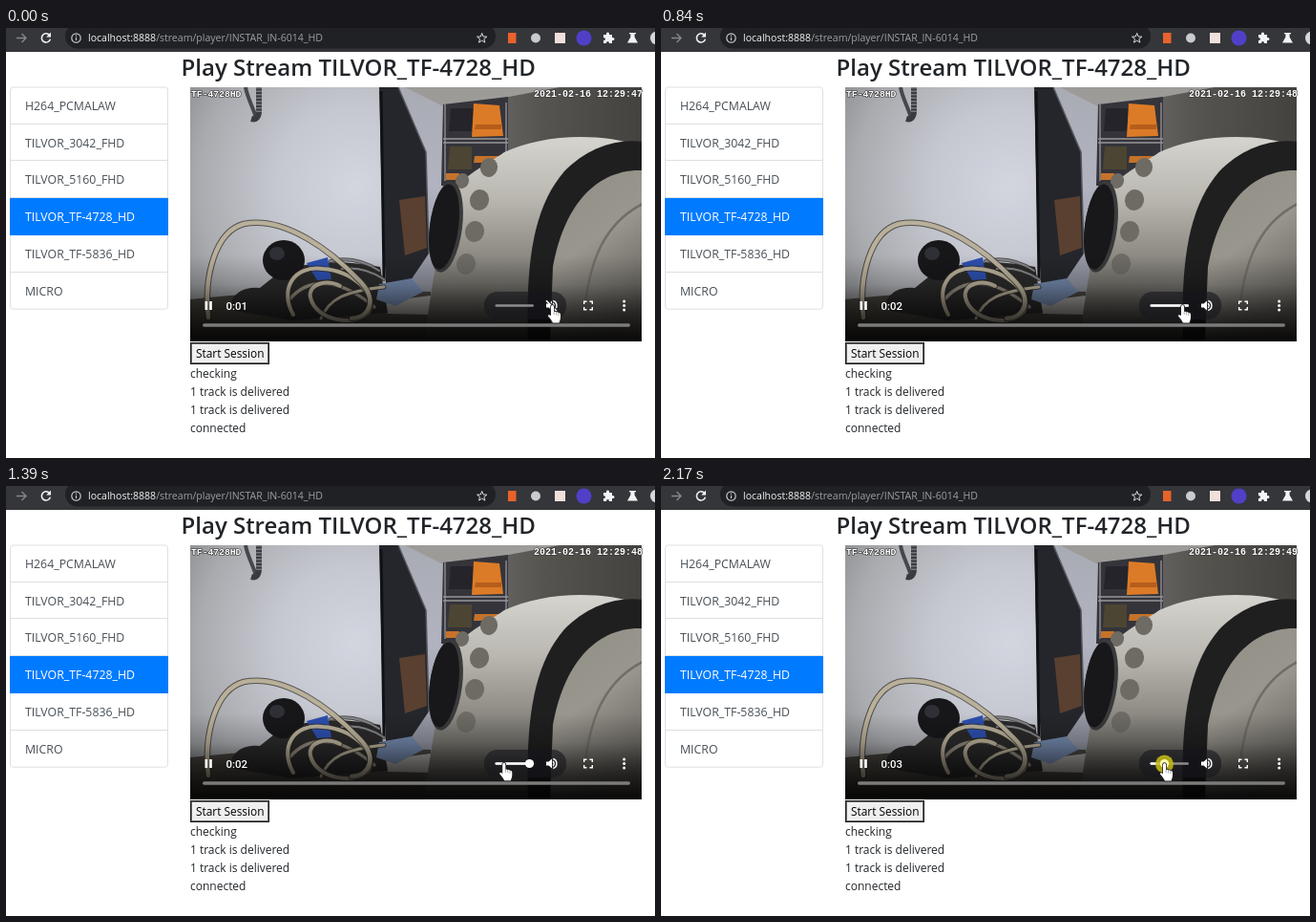
These frames come from a looping animation (680 px wide and 450 px high, 2250 ms). An HTML page with a canvas:

```html
<!DOCTYPE html>
<html lang="en">
<head>
<meta charset="utf-8">
<title>Play Stream</title>
<style>
  html, body { margin: 0; width: 100%; height: 100%; overflow: hidden; background: #fff; }
  canvas, svg { position: absolute; left: 0; top: 0; width: 680px; height: 450px; }
  text { font: 12px "Open Sans", "Noto Sans", sans-serif; fill: #212529; }
  .url { font-size: 10.55px; fill: #9aa0a6; }
  .url tspan { fill: #f1f3f4; }
  .title { font-size: 24px; font-weight: 600; }
  .item { font-size: 12.3px; fill: #495057; }
  .on { font-size: 12.3px; fill: #fff; }
  .osd { font: bold 10px "Liberation Mono", "DejaVu Sans Mono", monospace; fill: #fff;
         stroke: #333; stroke-width: 1.2px; paint-order: stroke; }
  .time { font: 500 11.4px Roboto, sans-serif; fill: #fff; }
</style>
</head>
<body>
<canvas id="stage"></canvas>
<svg id="labels" viewBox="0 0 680 450">
  <text class="url" x="86" y="14"><tspan>localhost:8888</tspan>/stream/player/INSTAR_IN-6014_HD</text>
  <text class="title" x="183.5" y="50.3">Play Stream TILVOR_TF-4728_HD</text>
  <text class="osd" x="194" y="72.2" style="font-size:9.7px">TF-4728HD</text>
  <text class="osd" id="stamp" x="553" y="72.2"></text>
  <text class="time" id="clock" x="230.5" y="294.6"></text>
  <text x="199" y="345" style="font-size:11.9px;fill:#000">Start Session</text>
</svg>
<script>
const W = 680, H = 450, LOOP = 2250;
const BEATS = [0, 70, 150, 230, 320, 380, 470, 550, 610, 690, 770, 840, 930, 1010, 1080,
  1160, 1240, 1310, 1390, 1470, 1540, 1620, 1710, 1780, 1850, 1940, 2020, 2100, 2170];
// pointer tip: time, x, y
const POINTER = [[0, 572.5, 291], [470, 572.5, 291], [840, 546.5, 291], [1240, 529.5, 291.5],
  [1540, 514, 290], [1620, 514, 290], [1850, 511.5, 290], [1940, 512, 290], [2170, 527.5, 291]];

const $ = id => document.getElementById(id);
const dpr = window.devicePixelRatio || 1;

function sized(canvas) {
  canvas.width = W * dpr;
  canvas.height = H * dpr;
  const c = canvas.getContext('2d');
  c.scale(dpr, dpr);
  return c;
}

const ctx = sized($('stage'));
const backdrop = document.createElement('canvas');
const bg = sized(backdrop);

function label(x, y, str, cls) {
  const el = document.createElementNS('http://www.w3.org/2000/svg', 'text');
  el.setAttribute('x', x);
  el.setAttribute('y', y);
  if (cls) el.setAttribute('class', cls);
  el.textContent = str;
  $('labels').append(el);
}

function box(c, x, y, w, h, fill, r = 0) {
  c.beginPath();
  c.roundRect(x, y, w, h, r);
  c.fillStyle = fill;
  c.fill();
}

function oval(c, x, y, rx, ry, fill, turn = 0) {
  c.beginPath();
  c.ellipse(x, y, rx, ry, turn, 0, 7);
  c.fillStyle = fill;
  c.fill();
}

function shape(c, d, fill) {
  c.fillStyle = fill;
  c.fill(new Path2D(d));
}

function line(c, d, color, width) {
  c.strokeStyle = color;
  c.lineWidth = width;
  c.stroke(new Path2D(d));
}

function spread(g, stops) {
  stops.forEach((s, i) => g.addColorStop(i / (stops.length - 1), s));
  return g;
}

const fade = (c, x0, y0, x1, y1, ...stops) => spread(c.createLinearGradient(x0, y0, x1, y1), stops);
const glow = (c, x, y, r, ...stops) => spread(c.createRadialGradient(x, y, 0, x, y, r), stops);

function toolbar(c) {
  box(c, 0, 0, W, 25, '#35363a');
  box(c, 62, -4, 451, 25.5, '#202124', 12.5);
  line(c, 'M11 10.5H21M16.5 6L21 10.5 16.5 15', '#85878b', 1.4);
  line(c, 'M45.6 7.6A4.6 4.6 0 1 0 46.4 11.6', '#f1f3f4', 1.6);
  shape(c, 'M47 4.6V9.4H42.2Z', '#f1f3f4');
  line(c, 'M78.2 10.5A4.7 4.7 0 1 1 68.8 10.5A4.7 4.7 0 1 1 78.2 10.5M73.5 9.8V13M73.5 7.6V8.7', '#c4c7ca', 1.2);
  c.beginPath();
  for (let i = 0; i < 10; i++) {
    const a = i * Math.PI / 5 - Math.PI / 2, r = i % 2 ? 2.3 : 5.4;
    c.lineTo(498.7 + r * Math.cos(a), 10.8 + r * Math.sin(a));
  }
  c.closePath();
  c.strokeStyle = '#dadce0';
  c.lineWidth = 1;
  c.stroke();
  box(c, 526, 5, 8.5, 11, '#e8622c');
  oval(c, 555, 10.5, 5, 5, '#c9cbce');
  box(c, 575, 5, 11, 11, '#f1dfdb');
  oval(c, 605.5, 10.5, 8, 8, '#5040c8');
  shape(c, 'M626 7H629Q628.500 4.500 630.500 4.500Q632.500 4.500 632 7H635V10Q637.500 9.500 637.500 11.500Q637.500 13.500 635 13V16H632Q632 14 630.500 14Q629 14 629 16H626V13Q628 13 628 11.500Q628 10 626 10Z', '#f1f3f4');
  shape(c, 'M653 5H660V6.300H658.600V9.500L662 15.500H651L654.400 9.500V6.300H653Z', '#f1f3f4');
  oval(c, 682, 10.5, 7, 7, '#d5d7da');
}

function sidebar(c) {
  const step = 38.7;
  c.strokeStyle = '#dfdfdf';
  c.lineWidth = 1;
  c.beginPath();
  c.roundRect(4.5, 62, 165, step * 6, 3);
  for (let i = 1; i < 6; i++) {
    c.moveTo(4.5, Math.round(62 + i * step) - .5);
    c.lineTo(169.5, Math.round(62 + i * step) - .5);
  }
  c.stroke();
  box(c, 4, 178, 166, 39, '#007bff');
  ['H264_PCMALAW', 'TILVOR_3042_FHD', 'TILVOR_5160_FHD', 'TILVOR_TF-4728_HD',
    'TILVOR_TF-5836_HD', 'MICRO'].forEach((s, i) =>
    label(20, 86 + i * step, s, i === 3 ? 'on' : 'item'));
}

function room(c) {
  box(c, 193, 62, 474, 267, glow(c, 365, 165, 245, '#d3d5df', '#c6c8d1', '#aaabaf', '#77787a'));
  // far side of the room
  box(c, 410, 62, 52, 230, fade(c, 0, 62, 0, 270, '#a9abb4', '#b1b4c0', '#8c8f9b'));
  box(c, 458, 62, 209, 120, fade(c, 458, 0, 667, 0, '#77767a', '#56544f', '#43423f'));
  shape(c, 'M418 62H580L516 74 458 82Z', '#9d9b98');
  shape(c, 'M458 80L526 72V165H456Z', '#34343a');
  shape(c, 'M466 84H490V108H464Z', '#24242a');
  shape(c, 'M490 79L517 81 521 113 488 114Z', '#dc7b27');
  shape(c, 'M492 101H519V106H491Z', '#b65d1c');
  line(c, 'M458 116H526M458 120H526M460 80V160M524 78V130', '#96969a', 1.3);
  shape(c, 'M465 124H488V148H463Z', '#4c4533');
  shape(c, 'M491 134H517V141H490Z', '#c5722a');
  shape(c, 'M461 152H475V159H461Z', '#c5722a');
  // wall phone cord
  line(c, 'M251 62C253 74 258 80 262 94', '#46474c', 4);
  line(c, 'M265 62V88Q264 97 257 95', '#3a3b40', 6);
  c.setLineDash([1.5, 2]);
  line(c, 'M265 62V88', '#777980', 6);
  c.setLineDash([]);
}

function cable(c, d, width, color = '#b9b09a') {
  line(c, d, 'rgba(50,46,40,.75)', width + 2);
  line(c, d, color, width);
}

function desk(c) {
  shape(c, 'M193 284Q300 272 445 276V329H193Z', '#48443e');
  shape(c, 'M390 287L445 280V300L400 299Z', '#a5a29e');
  shape(c, 'M236 286Q244 270 266 272L286 256Q330 238 392 250L400 298 300 306 240 296Z', '#2b2a2b');
  // monitor
  shape(c, 'M391 62H411L440 130 443 236 424 264 398 267 394 190Z', '#25262b');
  shape(c, 'M412 180L439 176 441 230 418 238Z', '#5a4030');
  line(c, 'M411 62L440 130 443 236', '#55565d', 1.5);
  line(c, 'M393 66L396 262', '#111216', 3);
  shape(c, 'M391 268L425 262 437 276 408 291 388 284Z', '#7186a9');
  oval(c, 291, 243, 22, 21, '#17171a');
  oval(c, 284, 236, 8, 7, '#2f3036');
  shape(c, 'M315 246L337 240 341 263 326 264Z', '#2c4fae');
  c.lineCap = 'round';
  cable(c, 'M340 244Q366 238 391 254M352 252Q375 249 396 263', 2, '#85878d');
  cable(c, 'M298 283C318 260 350 262 386 292', 3.5, '#8f897d');
  cable(c, 'M330 304C339 283 354 276 396 271', 3);
  cable(c, 'M301 300C286 274 301 248 332 252C362 254 390 278 380 297C366 314 324 306 319 282C316 267 337 263 350 270', 4);
  cable(c, 'M212 303C207 258 220 213 249 205C293 196 342 235 370 264C390 284 381 303 362 304', 4.5);
}

function camera(c) {
  shape(c, 'M438 329C444 285 452 230 466 175C478 154 504 143 522 130C560 112 620 108 667 124V329Z',
    fade(c, 0, 112, 0, 310, '#d6d5cf', '#b9b7b0', '#88867f', '#504e4a'));
  // dark ring with the grey face inside it
  shape(c, 'M547 329C544 240 554 186 585 150C608 126 640 115 667 119V329Z', '#1f1f20');
  shape(c, 'M667 149C617 147 584 188 573 250L570 329H667Z', fade(c, 570, 150, 667, 290, '#918e86', '#99968e', '#625f5a'));
  line(c, 'M604 329C606 250 624 206 667 184', '#716d67', 2.5);
  [[506, 146, 9], [478, 160, 7], [496, 180, 10], [491, 213, 10], [482, 247, 10]]
    .forEach(([x, y, r]) => oval(c, x, y, r, r + 1, '#6d6b64', .3));
  oval(c, 461, 208, 17, 48, '#3b3a3b', .13);
  oval(c, 459, 208, 15, 45, '#18181a', .13);
}

function player(c) {
  c.save();
  c.beginPath();
  c.rect(193, 62, 473, 266);
  c.clip();
  room(c);
  desk(c);
  camera(c);
  box(c, 193, 238, 474, 91, fade(c, 0, 238, 0, 328, 'rgba(0,0,0,0)', 'rgba(0,0,0,.18)', 'rgba(0,0,0,.6)', 'rgba(0,0,0,.92)'));
  box(c, 501, 276, 86, 29, 'rgba(24,24,30,.62)', 14);
  box(c, 208.5, 286, 2.6, 9, '#fff');
  box(c, 213.2, 286, 2.6, 9, '#fff');
  box(c, 206, 309.3, 448, 3.4, '#7b7b7b', 1.7);
  c.lineCap = 'butt';
  line(c, 'M605.700 289V286.200H608.500M611.500 286.200H614.300V289M614.300 292V294.800H611.500M608.500 294.800H605.700V292', '#fff', 1.4);
  [286, 290.5, 295].forEach(y => oval(c, 647.7, y, 1.5, 1.5, '#fff'));
  c.restore();
}

function speaker(c, muted) {
  c.save();
  c.translate(572, 290.5);
  c.lineCap = 'butt';
  shape(c, 'M-6 -2H-3.400L0 -5V5L-3.400 2H-6Z', '#fff');
  line(c, 'M1.200 -2.500Q3.200 0 1.200 2.500M1.200 -5A5.200 5.200 0 0 1 1.200 5', '#fff', 1.4);
  if (muted) {
    line(c, 'M-5 -5.800L6 5.200', '#222', 1.6);
    line(c, 'M-6 -5.200L5 5.800', '#fff', 1.4);
  }
  c.restore();
}

function hand(c, x, y) {
  c.save();
  c.translate(x, y);
  c.lineJoin = 'round';
  const d = 'M-1.500 1Q-1.500 -1 0 -1Q1.600 -1 1.600 1V6Q3 5.200 4 6.400Q5.600 5.800 6.300 7Q8.500 6.800 8.500 9V12Q8.500 14 7 17.500H.500Q-.500 15 -4.500 10.500Q-4.800 8.300 -1.500 10Z';
  line(c, d, '#222', 1.6);
  shape(c, d, '#fff');
  line(c, 'M1.700 6V9M4 6.500V9.500M6.300 7V10', '#777', .6);
  c.restore();
}

function pointerAt(t) {
  const i = POINTER.findIndex(p => p[0] > t);
  if (i < 0) return POINTER[POINTER.length - 1].slice(1);
  const [t0, x0, y0] = POINTER[i - 1], [t1, x1, y1] = POINTER[i];
  const k = (t - t0) / (t1 - t0);
  return [x0 + (x1 - x0) * k, y0 + (y1 - y0) * k];
}

function draw(now) {
  const raw = now % LOOP;
  const t = BEATS.filter(b => b <= raw).pop() || 0;
  const [x, y] = pointerAt(t);
  const drag = t >= 1540;
  const pressed = drag || (t >= 230 && t < 470);
  const muted = t < 470 || (t >= 1710 && t < 2020);
  const thumb = drag ? Math.max(517, Math.min(549, x)) : 548.5;
  const level = t < 470 ? 513 : drag ? thumb : 553;

  ctx.drawImage(backdrop, 0, 0, W, H);
  box(ctx, 512.5, 289.2, 40.5, 2.6, '#8c8c8c', 1.3);
  if (level > 513) box(ctx, 512.5, 289.2, level - 512.5, 2.6, '#fff', 1.3);
  if (pressed) oval(ctx, x, y, 9.5, 9.5, 'rgba(196,184,20,.88)');
  if (t >= 930) oval(ctx, thumb, 290.5, 4.6, 4.6, drag ? '#ffffb4' : '#fff');
  speaker(ctx, muted);
  hand(ctx, x, y);

  const sec = t < 550 ? 0 : t < 1540 ? 1 : 2;
  $('stamp').textContent = '2021-02-16 12:29:' + (47 + sec);
  $('clock').textContent = '0:0' + (1 + sec);
}

box(bg, 0, 0, W, H, '#fff');
toolbar(bg);
sidebar(bg);
player(bg);
box(bg, 193, 329, 83, 23, '#1c1c1c');
box(bg, 194, 330, 81, 21, '#666');
box(bg, 195, 331, 79, 19, '#efefef');
['checking', '1 track is delivered', '1 track is delivered', 'connected']
  .forEach((s, i) => label(193, 366.3 + i * 18.8, s));

const start = performance.now();
function tick() {
  draw(performance.now() - start);
  requestAnimationFrame(tick);
}
tick();
</script>
</body>
</html>
```
